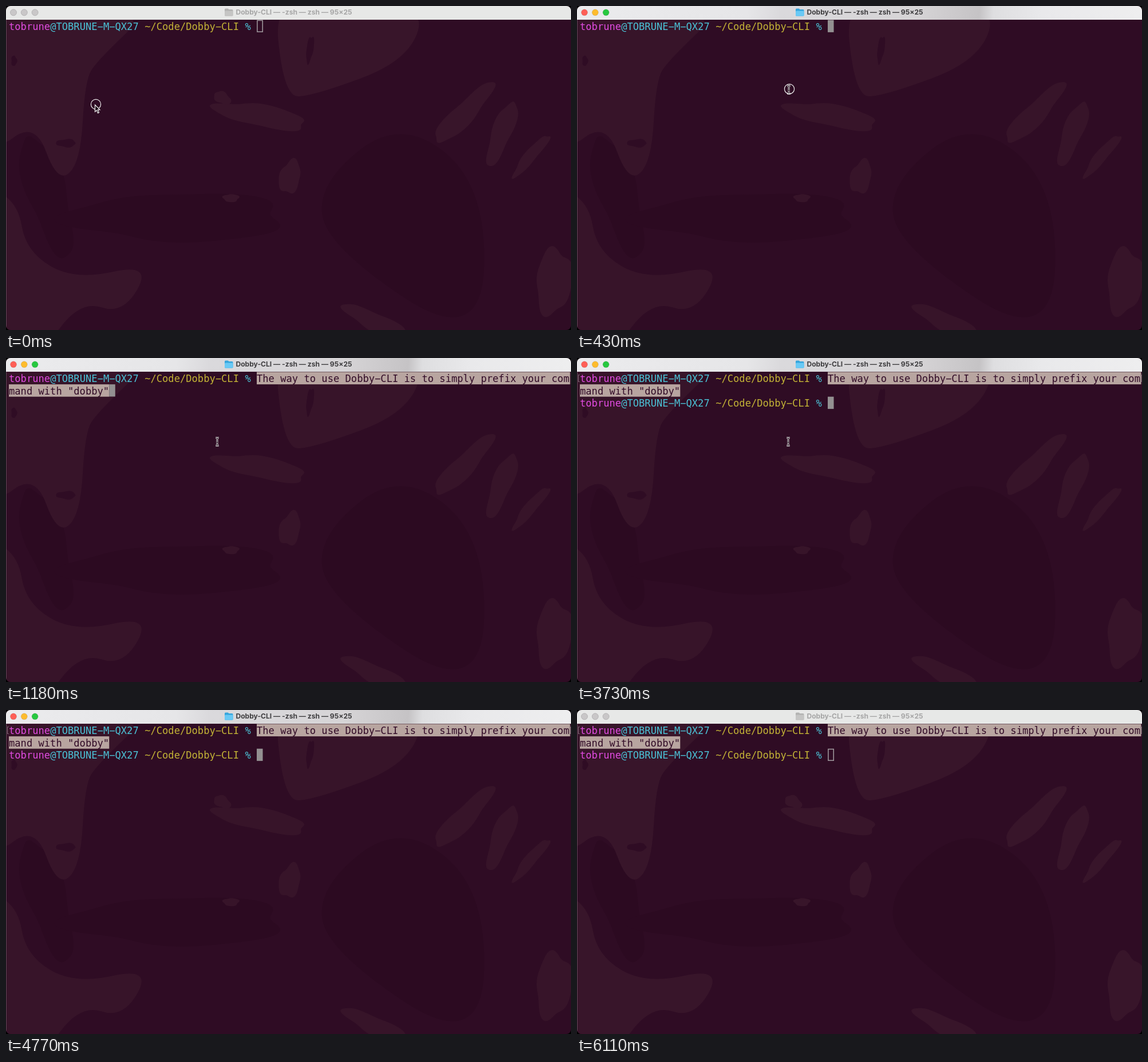
Write an HTML page with a canvas that moves like this. It is 987 px wide and 567 px high and loops after 8 s.

```html
<!DOCTYPE html>
<html lang="en">
<head>
<meta charset="utf-8">
<title>Terminal</title>
<style>
html, body { margin: 0; overflow: hidden; background: #000; }
canvas { display: block; }
</style>
</head>
<body>
<canvas id="stage" width="987" height="567"></canvas>
<script>
const W = 987, H = 567, LOOP = 8000;
const BAR = 24, LEFT = 5, CELL = 10.31, ROW = 21.6;
const ctx = document.getElementById('stage').getContext('2d');

// closed curve through the midpoints of a polygon's sides
function blob(...pts) {
  const n = pts.length / 2;
  const at = i => [pts[i % n * 2], pts[i % n * 2 + 1]];
  const mid = i => [(at(i)[0] + at(i + 1)[0]) / 2, (at(i)[1] + at(i + 1)[1]) / 2];
  ctx.beginPath();
  ctx.moveTo(...mid(0));
  for (let i = 1; i <= n; i++) ctx.quadraticCurveTo(...at(i), ...mid(i));
  ctx.fill();
}

// tilted ellipse with an uneven rim
function patch(x, y, rx, ry, tilt) {
  ctx.save();
  ctx.translate(x, y);
  ctx.rotate(tilt);
  ctx.beginPath();
  for (let a = 0; a < 2 * Math.PI; a += .1) {
    const k = 1 + .09 * Math.sin(3 * a + x) + .06 * Math.sin(5 * a + y);
    ctx.lineTo(rx * k * Math.cos(a), ry * k * Math.sin(a));
  }
  ctx.fill();
  ctx.restore();
}

function rect(color, x, y, w, h) {
  ctx.fillStyle = color;
  ctx.fillRect(x, y, w, h);
}

function wallpaper(active, t) {
  rect('#2f0c24', 0, 0, W, H);
  ctx.fillStyle = '#2c0a21';
  blob(545, 310, 690, 195, 840, 315, 830, 600, 560, 420);
  patch(72, 330, 34, 110, -.3);
  patch(300, 370, 190, 42, 0);

  ctx.fillStyle = active ? '#371429' : '#38152a';
  blob(-60, -20, 260, 0, 160, 95, 138, 130, 130, 275, 90, 310, 50, 200, -30, 265);
  blob(466, -40, 735, -10, 705, 95, 535, 158, 485, 158);
  blob(-50, 310, 20, 340, 35, 430, 120, 480, 255, 450, 205, 540, 130, 515, 60, 610, -60, 610);
  patch(445, 192, 82, 19, .18);
  patch(800, 188, 72, 18, -.8);
  patch(866, 222, 60, 17, -1.2);
  patch(917, 262, 48, 10, -.87);
  patch(496, 299, 18, 30, .25);
  patch(957, 482, 31, 58, .1);
  patch(645, 553, 62, 16, .45);
  patch(393, 336, 14, 7, 0);
  if (!active || t > 4620) patch(378, 161, 16, 10, .5);

  ctx.fillStyle = '#2f0c24';
  patch(105, 240, 17, 7, 0);
  patch(531, 76, 6, 24, .15);
  patch(14, 96, 5, 9, 0);
  rect('rgba(130,110,125,.55)', 0, BAR, 1, H - BAR);
}

function folder(active) {
  ctx.fillStyle = active ? '#35a5dc' : '#b3b3b2';
  ctx.beginPath();
  ctx.roundRect(382, 4.5, 7, 6, 1.5);
  ctx.roundRect(382, 6, 14.5, 11.5, 1.5);
  ctx.fill();
  ctx.fillStyle = active ? '#69c9f5' : '#c5c5c4';
  ctx.beginPath();
  ctx.roundRect(382, 8.5, 14.5, 9, 1.5);
  ctx.fill();
}

function titleBar(active) {
  let fill = '#e7e8e7';
  if (active) {
    fill = ctx.createLinearGradient(0, 0, W, 60);
    fill.addColorStop(0, '#ebebed');
    fill.addColorStop(.3, '#e6e6e8');
    fill.addColorStop(.36, '#dad9dc');
    fill.addColorStop(.6, '#d6d4d6');
    fill.addColorStop(.71, '#c5c3c5');
    fill.addColorStop(.735, '#dedee0');
    fill.addColorStop(.82, '#e9e9eb');
    fill.addColorStop(1, '#eeeeef');
  }
  rect(fill, 0, 0, W, BAR);
  ['#fe5f57', '#febc2e', '#28c840'].forEach((color, i) => {
    ctx.beginPath();
    ctx.arc(13 + 18.8 * i, 11.3, 5.5, 0, 7);
    ctx.fillStyle = active ? color : '#c9c7c8';
    ctx.fill();
    ctx.lineWidth = .8;
    ctx.strokeStyle = active ? 'rgba(0,0,0,.14)' : '#adabac';
    ctx.stroke();
  });
  folder(active);
  ctx.font = 'bold 12.1px Inter, sans-serif';
  ctx.textAlign = 'center';
  ctx.fillStyle = active ? '#3f3e40' : '#a6a6a6';
  ctx.fillText('Dobby-CLI — -zsh — zsh — 95×25', 503, 15.3);
  ctx.textAlign = 'left';
}

// the minus sign gives the terminal font's long hyphen
function print(str, col, row, color) {
  ctx.font = '17.13px "DejaVu Sans Mono", monospace';
  ctx.fillStyle = color;
  ctx.fillText(str.replaceAll('-', '−'), LEFT + col * CELL, 42 + row * ROW);
}

function prompt(row) {
  print('tobrune', 0, row, '#e04be0');
  print('@TOBRUNE-M-QX27', 7, row, '#4bc2d6');
  print('~/Code/Dobby-CLI', 23, row, '#c2b236');
  print('%', 40, row, '#4bc2d6');
}

function block(col, row, hollow) {
  const x = LEFT + col * CELL, y = BAR + .5 + row * ROW;
  if (!hollow) return rect('#939091', x, y, CELL + .2, ROW - .2);
  ctx.strokeStyle = '#a39da1';
  ctx.lineWidth = 1.5;
  ctx.strokeRect(x + .9, y + .8, CELL - 1, ROW - 1.8);
}

function message() {
  rect('#b8a5a0', LEFT + 42 * CELL, BAR + .5, 53 * CELL + 1, ROW);
  rect('#b8a5a0', LEFT, BAR + .5 + ROW, 17 * CELL, ROW);
  print('The way to use Dobby-CLI is to simply prefix your com', 42, 0, '#320c27');
  print('mand with "dobby"', 0, 1, '#320c27');
}

function lineMark(x, d) {
  ctx.strokeStyle = '#8b7783';
  ctx.lineWidth = 1;
  ctx.beginPath();
  ctx.moveTo(x + d, 29.5);
  ctx.lineTo(x, 29.5);
  ctx.lineTo(x, 41.5);
  ctx.lineTo(x + d, 41.5);
  ctx.stroke();
}

function ring(x, y) {
  ctx.beginPath();
  ctx.arc(x, y, 8.6, 0, 7);
  ctx.strokeStyle = '#eee';
  ctx.lineWidth = 1.2;
  ctx.stroke();
}

function beam(x, y) {
  ctx.beginPath();
  for (const s of [-1, 1]) {
    ctx.moveTo(x - 2.7, y + 7.2 * s);
    ctx.quadraticCurveTo(x, y + 7 * s, x, y + 5 * s);
    ctx.quadraticCurveTo(x, y + 7 * s, x + 2.7, y + 7.2 * s);
  }
  ctx.moveTo(x, y - 5);
  ctx.lineTo(x, y + 5);
  ctx.moveTo(x - 1.5, y + 1);
  ctx.lineTo(x + 1.5, y + 1);
  ctx.strokeStyle = '#eee';
  ctx.lineWidth = 2.8;
  ctx.stroke();
  ctx.strokeStyle = '#1c0b17';
  ctx.lineWidth = 1;
  ctx.stroke();
}

const ARROW = new Path2D('M0 0V12L2.8 9.4 5 14.4 7 13.5 4.8 8.6H8.5Z');

function arrow(x, y) {
  ctx.save();
  ctx.translate(x, y);
  ctx.fillStyle = '#1c0b17';
  ctx.fill(ARROW);
  ctx.strokeStyle = '#eee';
  ctx.lineWidth = 1.2;
  ctx.stroke(ARROW);
  ctx.restore();
}

function pointer(t) {
  if (t < 140) {
    ring(157, 172);
    arrow(155.5, 173);
  }
  else if (t < 290) beam(354, 167);
  else if (t < 430) beam(375, 152.5);
  else if (t < 1030) beam(370, 146.5);
  else if (t < 4620) beam(369, 146.5);
  else if (t < 4770) beam(556, 156.5);
  if (t >= 430 && t < 580) ring(371, 145.2);
}

function draw(t) {
  const active = t >= 430 && t < 5960;
  wallpaper(active, t);
  titleBar(active);
  prompt(0);
  if (t >= 1180) message();
  if (t < 1180) block(42, 0, !active);
  else if (t < 3730) block(17, 1, false);
  else {
    prompt(2);
    lineMark(2.5, 2);
    lineMark(986.5, -2);
    block(42, 2, t >= 6110);
  }
  pointer(t);
}

function frame() {
  ctx.save();
  ctx.clearRect(0, 0, W, H);
  ctx.beginPath();
  ctx.roundRect(0, 0, W, H, 8);
  ctx.clip();
  draw(performance.now() % LOOP);
  ctx.restore();
  requestAnimationFrame(frame);
}
frame();
</script>
</body>
</html>
```
